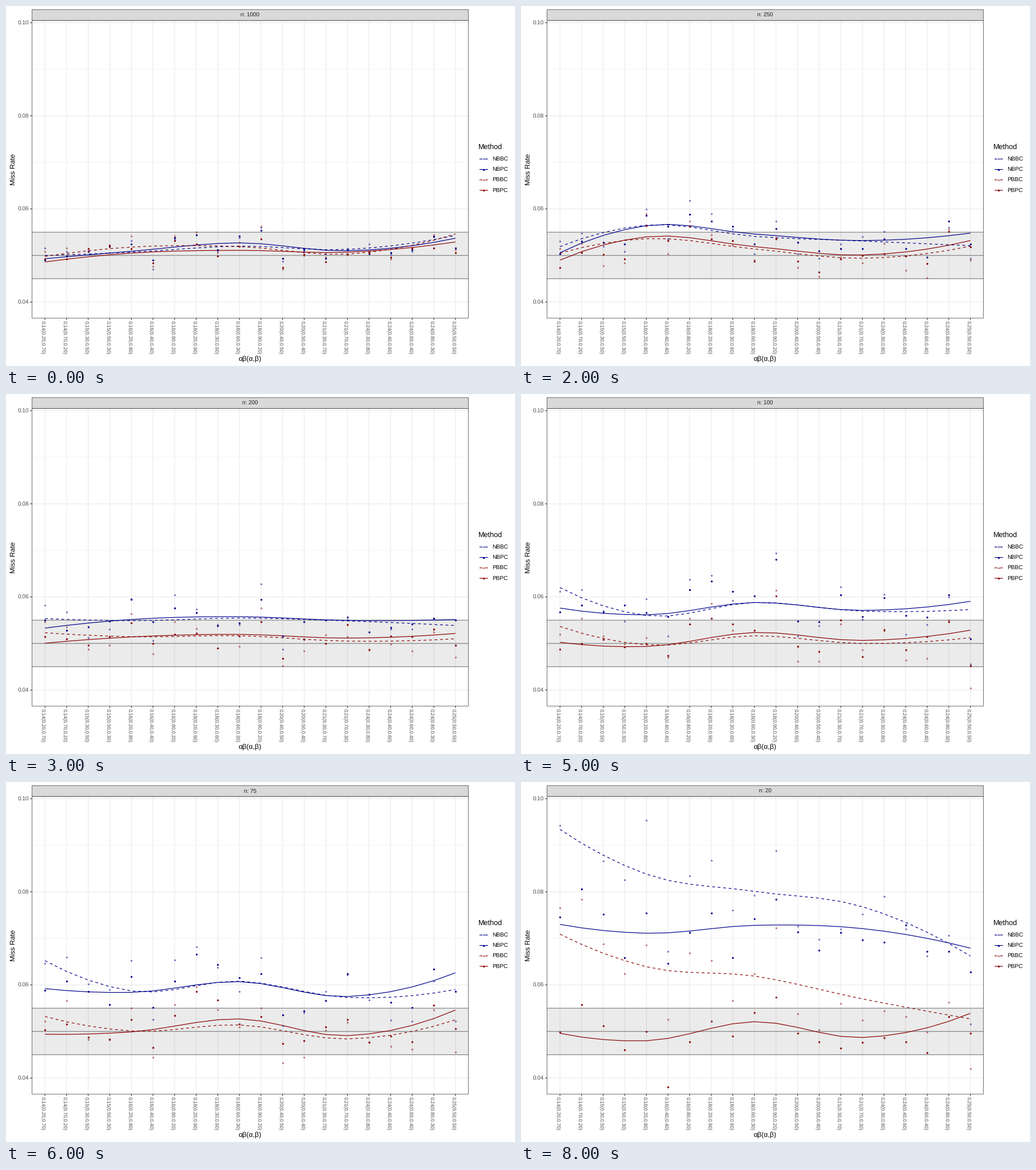
Write a matplotlib script that moves like this. It is 890 px wide and 629 px high and loops after 9000 ms.

```python
import numpy as np
import matplotlib.pyplot as plt
from matplotlib.animation import FuncAnimation
from matplotlib.patches import Rectangle

W, H, DPI = 890, 629, 100
PT = 72 / DPI
LEFT, RIGHT, TOP, BOTTOM = 45.5, 808.5, 25.2, 545.2
BLUE, RED, BORDER = "#00008B", "#8B0000", "#333333"

plt.rcParams["font.family"] = "Liberation Sans"
plt.rcParams["text.hinting"] = "none"

# (alpha, beta) in tenths
PAIRS = [(2, 7), (7, 2), (3, 5), (5, 3), (2, 8), (4, 4), (8, 2), (2, 9), (3, 6), (6, 3),
         (9, 2), (4, 5), (5, 4), (3, 7), (7, 3), (3, 8), (4, 6), (6, 4), (8, 3), (5, 5)]
X = np.arange(1, len(PAIRS) + 1)
SIZES = [1000, 500, 250, 200, 150, 100, 75, 50, 20]

# name, colour, dashed line, dot opacity, pull of |alpha - beta| on the dots
METHODS = [("NBBC", BLUE, True, 0.5, 0.8), ("NBPC", BLUE, False, 1, 0.4),
           ("PBBC", RED, True, 0.5, 0.8), ("PBPC", RED, False, 1, 0.4)]

# height of each method's curve at the knots, in 1e-4
KNOTS = np.array([1, 5, 10, 15, 20])
KEYS = {
    1000: [(500, 507, 520, 513, 543), (493, 509, 527, 510, 537),
           (498, 518, 519, 503, 546), (486, 505, 511, 507, 529)],
    250: [(519, 565, 541, 531, 521), (506, 564, 546, 532, 548),
          (505, 536, 514, 494, 520), (490, 540, 519, 501, 532)],
    150: [(588, 533, 568, 566, 556), (560, 539, 569, 567, 555),
          (541, 493, 519, 516, 500), (511, 488, 520, 522, 511)],
    75: [(652, 587, 608, 573, 590), (592, 584, 607, 575, 626),
         (532, 501, 514, 484, 525), (494, 499, 527, 491, 546)],
    50: [(640, 627, 629, 597, 590), (578, 621, 631, 598, 638),
         (542, 519, 514, 474, 472), (488, 511, 523, 470, 507)],
    20: [(934, 838, 801, 768, 662), (730, 711, 728, 721, 679),
         (709, 639, 619, 570, 527), (496, 480, 521, 487, 539)],
}


def px(x):
    return LEFT + (x - 0.4) * (RIGHT - LEFT) / 20.2


def py(rate):
    return 29.2 + (0.1 - rate) * 8133


def keys_at(n):
    """Knot heights for n, halfway between its neighbours where none are set."""
    if n in KEYS:
        return np.array(KEYS[n])
    i = SIZES.index(n)
    return (keys_at(SIZES[i - 1]) + keys_at(SIZES[i + 1])) / 2


def smooth(keys):
    """Cubic Hermite curve through the knots, taken at every pair."""
    m = np.gradient(keys, KNOTS, edge_order=2)
    i = np.clip(np.searchsorted(KNOTS, X, side="right") - 1, 0, len(KNOTS) - 2)
    h = KNOTS[i + 1] - KNOTS[i]
    t = (X - KNOTS[i]) / h
    s = t * t * (3 - 2 * t)
    return (keys[i] * (1 - s) + keys[i + 1] * s
            + h * t * (1 - t) * (m[i] * (1 - t) - m[i + 1] * t))


def scatter(n, fits):
    """Simulated rates: unequal pairs lie higher, and small samples spread more."""
    rng = np.random.default_rng(n)
    gap = np.array([abs(a - b) for a, b in PAIRS])
    lean = (gap - gap.mean()) / gap.std()
    spread = 75 * (n / 20) ** -0.3
    shared = 0.45 * rng.normal(size=len(X))
    rows = []
    for fit, (*_, pull) in zip(fits, METHODS):
        own = 0.2 * rng.normal(size=len(X))
        rows.append(np.round((fit + spread * (pull * lean + shared + own)) / 2) * 2)
    return rows


fig = plt.figure(figsize=(W / DPI, H / DPI), dpi=DPI, facecolor="white")
ax = fig.add_axes([0, 0, 1, 1])
ax.set_xlim(0, W)
ax.set_ylim(H, 0)
ax.axis("off")


def line(xs, ys, color, width=1.2, dashed=False, z=1):
    style = (0, (4, 4)) if dashed else "-"
    return ax.plot(xs, ys, color=color, lw=width * PT, ls=style, zorder=z,
                   dash_capstyle="butt", solid_capstyle="butt", snap=False)[0]


def dots(xs, ys, color, alpha, z=4):
    return ax.plot(xs, ys, "o", color=color, alpha=alpha, ms=3.3 * PT, mew=0, zorder=z)[0]


def box(y0, y1, z, **style):
    ax.add_patch(Rectangle((LEFT, y0), RIGHT - LEFT, y1 - y0, zorder=z, snap=False, **style))


def label(x, y, s, size, color="black", ha="left", rot=0):
    return ax.text(x, y, s, fontsize=size * PT, color=color, ha=ha, va="baseline",
                   rotation=rot, rotation_mode="anchor", zorder=7)


# grid, ticks and tick labels
for v in (0.05, 0.07, 0.09):
    line([LEFT, RIGHT], [py(v)] * 2, "#EBEBEB", 0.6)
for v in (0.04, 0.06, 0.08, 0.10):
    y = py(v)
    line([LEFT, RIGHT], [y, y], "#EBEBEB")
    line([LEFT - 3.2, LEFT], [y, y], BORDER)
    label(40, y + 3.6, f"{v:.2f}", 10, "#4D4D4D", "right")
for i, (a, b) in zip(X, PAIRS):
    x = px(i)
    line([x, x], [TOP, BOTTOM], "#EBEBEB")
    line([x, x], [BOTTOM, BOTTOM + 3.2], BORDER)
    label(x - 6.2, 549.8, f"{a * b / 100:.2f}({a / 10:.2f},{b / 10:.2f})", 8.6, "#4D4D4D", rot=270)

# tolerance band
box(py(0.055), py(0.045), 2, fc="black", ec="none", alpha=0.08)
for v in (0.045, 0.05, 0.055):
    line([LEFT, RIGHT], [py(v)] * 2, "#6E6E6E", 1, z=2)

# frame, strip and titles
box(TOP, BOTTOM, 6, fc="none", ec=BORDER, lw=0.7 * PT)
box(6.2, TOP, 6, fc="#D9D9D9", ec=BORDER, lw=0.7 * PT)
strip = label(427, 19.3, "", 9.9, "#1A1A1A", "center")
label(427, 620.3, "αβ(α,β)", 12.4, ha="center")
label(15.6, 285.2, "Miss Rate", 12.4, ha="center", rot=90)

# legend
label(826, 250.2, "Method", 12.6)
for k, (name, color, dashed, alpha, _) in enumerate(METHODS):
    y = 267.4 + 18.2 * k
    line([828, 842.6], [y, y], color, dashed=dashed)
    dots([835.3], [y], color, alpha)
    label(850.6, y + 3.6, name, 10)

curves = [line([], [], color, dashed=dashed, z=3) for _, color, dashed, *_ in METHODS]
points = [dots([], [], color, alpha) for _, color, _, alpha, _ in METHODS]


def update(i):
    n = SIZES[i]
    strip.set_text(f"n: {n}")
    fits = [smooth(keys) for keys in keys_at(n)]
    rates = scatter(n, fits)
    for curve, point, fit, rate in zip(curves, points, fits, rates):
        curve.set_data(px(X), py(fit * 1e-4))
        point.set_data(px(X), py(rate * 1e-4))
    return [strip, *curves, *points]


anim = FuncAnimation(fig, update, frames=len(SIZES), interval=1000, repeat=True, repeat_delay=0)
plt.show()
```
